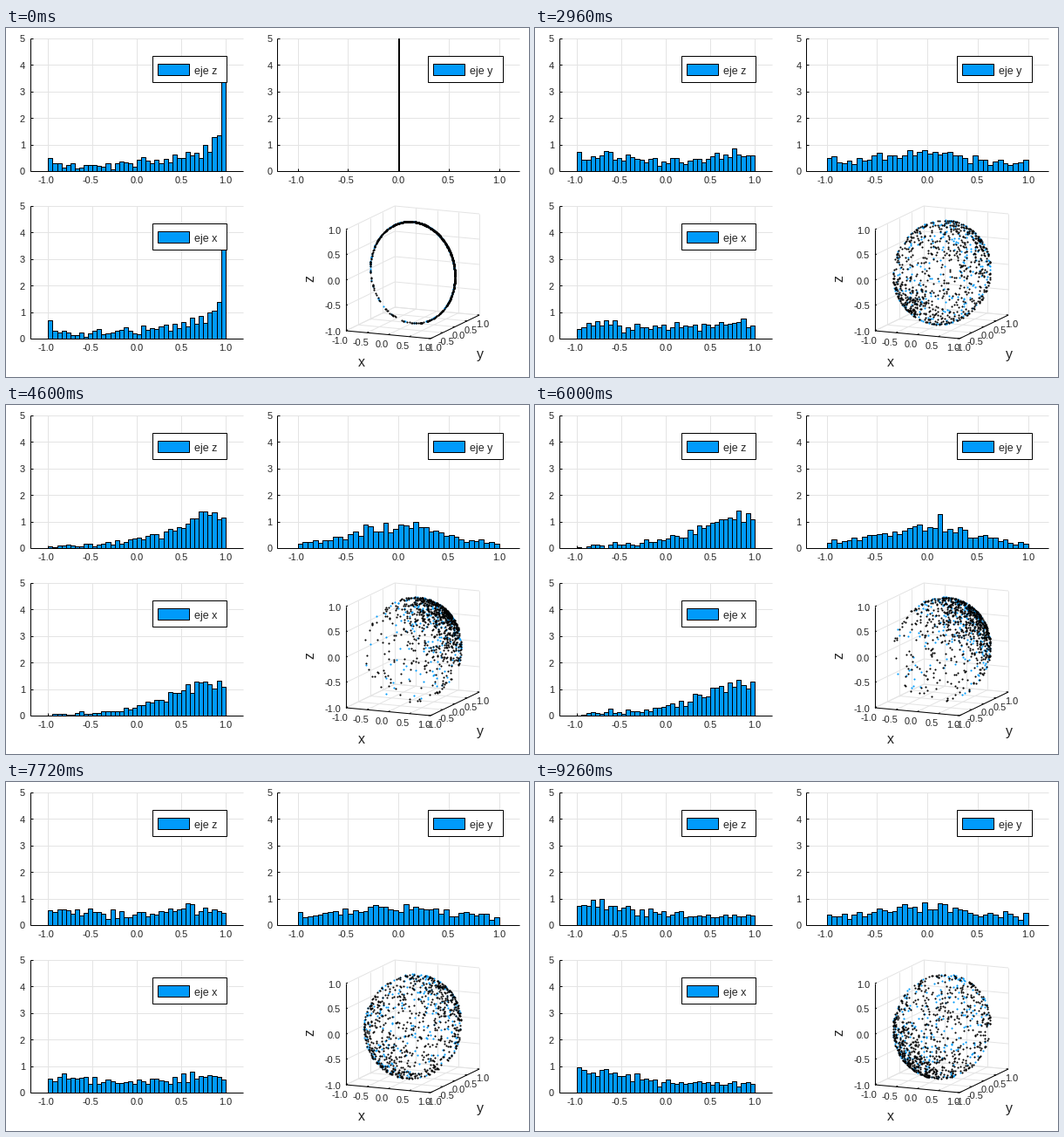
Animation of 600x400 px, one loop 9280 ms. Source, as a matplotlib script:

```python
import numpy as np
import matplotlib.pyplot as plt
from matplotlib.animation import FuncAnimation
from matplotlib.collections import LineCollection, PolyCollection
from matplotlib.patches import Rectangle

W, H, DPI = 600, 400, 100
PX = 72 / DPI
BLUE = "#009afa"
INK = "#222222"
STEPS, N = 200, 1000
TICKS = np.linspace(-1, 1, 5)
EDGES = np.linspace(-1, 1, 41)

plt.rcParams["font.family"] = "Liberation Sans"
fig = plt.figure(figsize=(W / DPI, H / DPI), dpi=DPI, facecolor="white")
ax = fig.add_axes([0, 0, 1, 1])
ax.set_xlim(0, W)
ax.set_ylim(H, 0)
ax.axis("off")


def lines(segs, color, width=1.0, z=1):
    ax.add_collection(LineCollection(segs, colors=color, linewidths=width * PX,
                                     zorder=z))


def label(x, y, s, size=11, ha="center", z=6, **kw):
    ax.text(x, y, s, fontsize=size * PX, ha=ha, va="center_baseline",
            color=INK, zorder=z, **kw)


class Histogram:
    """Density histogram panel with its grid, axes and legend."""

    def __init__(self, left, right, top, name, legend_x):
        self.left, self.top, self.bottom = left, top, top + 152
        self.mid, self.unit = (left + right) / 2, (right - left) / 2.4
        bottom = self.bottom
        xs, ys = self.px(TICKS), [self.py(v) for v in range(6)]
        lines([[(x, top), (x, bottom)] for x in xs]
              + [[(left, y), (right, y)] for y in ys], "#e4e4e4")
        lines([[(left, top), (left, bottom)], [(left, bottom), (right, bottom)]]
              + [[(x, bottom), (x, bottom - 3)] for x in xs]
              + [[(left, y), (left + 3, y)] for y in ys], "black", z=4)
        for v, x in zip(TICKS, xs):
            label(x - (2 if v < 0 else 0), bottom + 10.5, f"{v:.1f}")
        for v, y in enumerate(ys):
            label(left - 6, y + 0.5, str(v), ha="right")
        self.bars = PolyCollection([], facecolors=BLUE, edgecolors="black",
                                   linewidths=PX, zorder=3)
        ax.add_collection(self.bars)
        ax.add_patch(Rectangle((legend_x, top + 19.6), 85.4, 30, fc="white",
                               ec="black", lw=PX, zorder=7))
        ax.add_patch(Rectangle((legend_x + 6, top + 28.6), 36, 13, fc=BLUE,
                               ec="black", lw=PX, zorder=8))
        label(legend_x + 48, top + 36, name, 12.5, "left", 8)

    def px(self, v):
        return self.mid + self.unit * v

    def py(self, v):
        return self.bottom - 30.4 * np.minimum(v, 5)

    def show(self, values):
        if np.ptp(values) < 1e-9:
            x = self.px(0)
            self.bars.set_verts([[(x - 0.5, self.bottom), (x - 0.5, self.top),
                                  (x + 0.5, self.top), (x + 0.5, self.bottom)]])
            return
        dens = np.histogram(np.clip(values, -1, 1), EDGES)[0] / (N * 0.05)
        xs, ys, b = self.px(EDGES), self.py(dens), self.bottom
        self.bars.set_verts([[(x0, b), (x0, y), (x1, y), (x1, b)]
                             for x0, x1, y in zip(xs, xs[1:], ys) if y < b])


def project(x, y, z):
    return (466.5 + 48.5 * x + 28 * y, 280 + 4.5 * x - 13.5 * y - 58 * z)


def seg(a, b):
    return [project(*a), project(*b)]


def draw_box():
    grid = []
    for t in TICKS:
        grid += [seg((-1, -1, t), (-1, 1, t)), seg((-1, 1, t), (1, 1, t)),
                 seg((t, 1, -1), (t, 1, 1)), seg((t, -1, -1), (t, 1, -1)),
                 seg((-1, t, -1), (-1, t, 1)), seg((-1, t, -1), (1, t, -1))]
    lines(grid, "#e4e4e4")
    axes = [seg((-1, -1, -1), (-1, -1, 1)), seg((-1, -1, -1), (1, -1, -1)),
            seg((1, -1, -1), (1, 1, -1))]
    for t in TICKS:
        axes += [seg((-1, -1, t), (-1, -0.93, t)),
                 seg((t, -1, -1), (t, -0.93, -1)),
                 seg((1, t, -1), (0.95, t, -1))]
    lines(axes, "black", z=2)
    for t in TICKS:
        s = f"{t:.1f}"
        x, y = project(-1, -1, t)
        label(x - 6, y + 0.5, s, ha="right")
        x, y = project(t, -1, -1)
        label(x - 7, y + 10.5, s)
        x, y = project(1, t, -1)
        label(x + 4, y + 10, s)
    label(408, 382, "x", 16)
    label(544, 373, "y", 16)
    label(349, 289, "z", 16, rotation=90)


# Concentration about the (1, 0, 1) axis; negative gathers at the far pole.
BEATS = [(0, 1.25), (10, -3), (23, 10), (35, 0.35), (46, -5), (64, 0.05),
         (74, 3), (82, -1), (90, 2.6), (98, 2.0), (108, -0.8), (118, 2.1),
         (128, 1.8), (140, -1.6), (156, 1.3), (166, 0.15), (178, -1.2),
         (190, -1), (199, -0.5)]

rng = np.random.default_rng(7)
share = rng.random(N)
drift = rng.normal(0, 0.002, N)
spin = rng.normal(0, 0.1, N)
scatter = rng.normal(0, 0.27, (2, N))
ARC = np.linspace(-np.pi, np.pi, 721)


def kappa(t):
    for (t0, a), (t1, b) in zip(BEATS, BEATS[1:]):
        if t <= t1:
            s = (t - t0) / (t1 - t0)
            return a + (b - a) * s * s * (3 - 2 * s)


def points(t):
    cdf = np.cumsum(np.exp(kappa(t) * np.cos(ARC)))
    cdf = (cdf - cdf[0]) / (cdf[-1] - cdf[0])
    theta = np.interp((share + drift * t) % 1, cdf, ARC)
    phi = spin * t
    dv, dy = scatter * min(t / 20, 1)
    u = np.cos(theta)
    v = np.sin(theta) * np.cos(phi) + dv
    y = np.sin(theta) * np.sin(phi) + dy
    r = np.sqrt(u * u + v * v + y * y)
    u, v, y = u / r, v / r, y / r
    return (u + v) / 2**0.5, y, (u - v) / 2**0.5


hist_z = Histogram(28, 272, 12, "eje z", 168)
hist_y = Histogram(311.4, 588.6, 12, "eje y", 484.2)
hist_x = Histogram(28, 272, 204, "eje x", 168)
draw_box()
glints, = ax.plot([], [], "o", ms=2.1 * PX, mew=0, color=BLUE, zorder=3)
dots, = ax.plot([], [], "o", ms=2.1 * PX, mew=0, color="black", zorder=4)

# Two short steps follow each long one; the last step is short.
TICKS_PER_STEP = [5 if i % 3 == 1 and i < STEPS - 1 else 1 for i in range(STEPS)]
SHOWN = np.repeat(np.arange(STEPS), TICKS_PER_STEP)


def update(k):
    x, y, z = points(int(SHOWN[k]))
    hist_x.show(x)
    hist_y.show(y)
    hist_z.show(z)
    px, py = project(x, y, z)
    lit = (px % 1 < 0.5) & (py % 1 < 0.5)
    dots.set_data(px[~lit], py[~lit])
    glints.set_data(px[lit], py[lit])
    return hist_x.bars, hist_y.bars, hist_z.bars, dots, glints


anim = FuncAnimation(fig, update, frames=len(SHOWN), interval=20,
                     init_func=lambda: update(0), repeat=True, repeat_delay=0)
plt.show()
```
